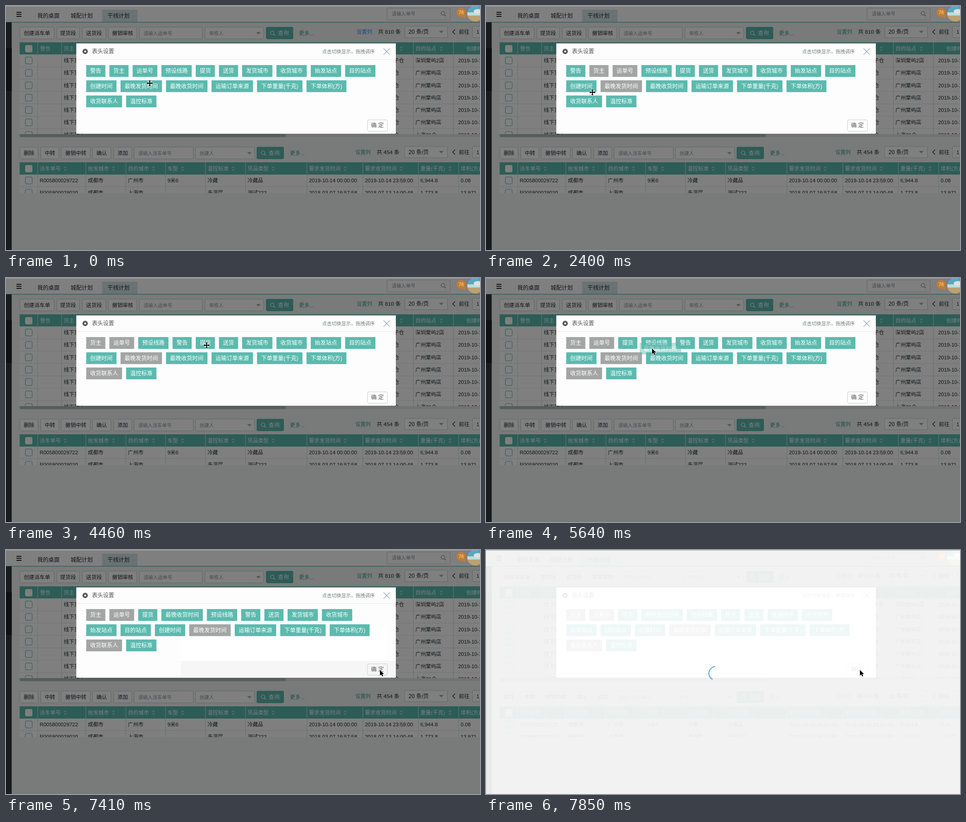
These frames come from a looping animation (1042x537 px, 8000 ms). An HTML page:

```html
<!DOCTYPE html>
<html lang="zh-CN">
<head>
<meta charset="utf-8">
<title>表头设置</title>
<style>
html, body { margin: 0; width: 100%; height: 100%; overflow: hidden; background: #808080; }
svg { display: block; width: 100%; height: 100%; }
text { font-family: "Liberation Sans", "Noto Sans CJK SC", "Noto Sans CJK", sans-serif; white-space: pre; }
</style>
</head>
<body>
<svg id="stage" viewBox="0 0 1042 537" preserveAspectRatio="none"></svg>
<script>
const LOOP = 8000, STEP = 148.3;
const TEAL = '#5bbaae', GRAY = '#a2a5a4', INK = '#23272d', HINT = '#8d9299', EDGE = '#c9cdd2';

// ---- drawing helpers: y of a text is its middle ----
const rect = (x, y, w, h, fill, extra = '') =>
  `<rect x="${x}" y="${y}" width="${w}" height="${h}" fill="${fill}" ${extra}/>`;
const text = (x, y, s, size = 11.5, fill = INK, extra = '') =>
  `<text x="${x}" y="${(y + size * 0.365).toFixed(2)}" font-size="${size}" fill="${fill}" ${extra}>${s}</text>`;
const path = (d, stroke, width = 1, fill = 'none') =>
  `<path d="${d}" stroke="${stroke}" stroke-width="${width}" fill="${fill}"/>`;
const box = (x, y, w, h, fill = '#fff') => rect(x + .5, y + .5, w - 1, h - 1, fill, `rx="3" stroke="${EDGE}"`);
const button = (x, y, w, s) => box(x, y, w, 27) +
  text(x + w / 2, y + 14, s, 11.6, INK, 'text-anchor="middle"');
const check = (y, head) => rect(42.5, y - 7.5, 15, 15, '#fff', `rx="2.500" stroke="${head ? '#fff' : TEAL}"`);
const lens = (x, y, color) =>
  `<circle cx="${x - 1}" cy="${y - 1}" r="4" fill="none" stroke="${color}" stroke-width="1.2"/>` +
  path(`M${x + 2} ${y + 2}l3.5 3.5`, color, 1.3);
const caret = (x, y) => `<path d="M${x - 5} ${y - 2.5}h10l-5 5.5z" fill="#a9adb3"/>`;
const sorter = (x, y) => `<path d="M${x - 4} ${y - 1.5}l4-4l4 4zM${x - 4} ${y + 1.5}l4 4l4-4z" fill="#a5d3cb"/>`;
const search = (x, y) => rect(x, y, 60, 27, TEAL, 'rx="3"') + lens(x + 15, y + 14, '#fff') +
  text(x + 26.5, y + 14, '查询', 12, '#fff');

function field(x, y, w, hint, drop) {
  return box(x, y, w, 27) + text(x + 9.5, y + 14, hint, 10.5, HINT) + (drop ? caret(x + w - 12, y + 14) : '');
}

function pager(x, y, count, id) {
  return text(x, y, '设置列', 11.3, '#36a093', `id="${id}"`) + text(x + 47, y, `共 ${count} 条`, 11.8) +
    box(876, y - 13, 95, 26) + text(885, y, '20 条/页', 12.1) + caret(957, y) +
    path(`M987 ${y - 5}l-5 5l5 5`, INK, 1.3) + text(995.5, y, '前往', 11.6) +
    box(1025, y - 13, 40, 26) + text(1034, y, '1', 11.6);
}

function header() {
  const bars = [14, 18.5, 23].map(y => rect(23, y - 1, 11, 1.8, '#111')).join('');
  return rect(0, 0, 1042, 36, '#fff') + rect(211, 8, 78, 27, '#d5e8e8') + rect(0, 35, 1042, 1.3, TEAL) + bars +
    text(69, 21.5, '我的桌面', 12.2) + text(142, 21.5, '城配计划', 12.2) + text(223, 21.5, '干线计划', 12.2) +
    box(837, 4, 140, 27) + text(848, 17.5, '请输入单号', 10.4, HINT) + lens(961.5, 17, '#8a8f96');
}

function avatar() {
  return '<g fill="#c47d2f"><circle cx="1000.500" cy="14" r="10"/><path d="M1001 22l8-4l1.500 8.500z"/></g>' +
    text(1000.5, 14, '78', 10.5, '#e6dccb', 'text-anchor="middle"') +
    '<clipPath id="face"><circle cx="1031" cy="17" r="17"/></clipPath><g clip-path="url(#face)">' +
    rect(1014, 0, 34, 16, '#58a8c4') + rect(1014, 14, 34, 8, '#c6d8d8') + rect(1014, 21, 34, 14, '#bd9f72') +
    '<ellipse cx="1037" cy="12" rx="9" ry="5" fill="#dbe3e2"/></g>';
}

function upperTable() {
  const head = 94, gap = 27.25;
  let s = rect(30, 80, 1012, 202, '#fff') + rect(30, 80, 1012, 26.5, TEAL) + check(head, true) +
    text(75, head, '警告', 11.5, '#fff') + text(127, head, '货主', 11.5, '#fff') + sorter(869, head) +
    text(900, head, '目的站点', 11.5, '#fff') + sorter(957, head) + text(1012, head, '创建时间', 11.5, '#fff');
  for (let i = 0; i < 7; i++) {
    const y = 120 + i * gap;
    const site = i == 0 ? '深圳棠屿2店' : i == 6 ? '上海01仓' : '广州棠屿店';
    s += check(y) + text(127, y, '线下货主', 11.5) + text(i ? 864.5 : 875, y, '子仓', 11.5, INK, 'text-anchor="end"') +
      text(900, y, site, 11.4) + text(994, y, '2019-10-14', 11.4) + rect(30, y + 13.2, 1012, 1, '#dfe5e4');
  }
  for (const x of [69, 122, 895, 983]) s += rect(x, 80, 1, 202, '#d5dfdd');
  return `<g clip-path="url(#upper)">${s}</g>` + rect(30, 282, 1012, 6.5, '#e4e8e8') +
    rect(30, 282, 585, 6.5, '#a9bdba', 'rx="3"');
}

function lowerTable() {
  const cols = [
    [69, '派车单号', 'R005800029722', 'R005800029020'], [175, '始发城市', '成都市', '成都市'],
    [263, '目的城市', '广州市', '上海市'], [350, '车型', '9米6', ''], [438, '温控标准', '冷藏', '多温层'],
    [526, '货品类型', '冷藏品', '测试222'], [661, '要求发货时间', '2019-10-14 00:00:00', '2018-03-07 16:57:58'],
    [784, '要求收货时间', '2019-10-14 23:59:00', '2018-07-13 14:00:48'],
    [906, '重量(千克)', '6,944.8', '1,773.8'], [994.5, '体积(方)', '0.08', '13.971']];
  let s = rect(30, 344, 1012, 68, '#fff') + rect(30, 344, 1012, 27, TEAL) + rect(30, 397, 1012, 1, '#dfe5e4') +
    check(358, true) + check(384) + check(411);
  for (const [x, name, a, b] of cols) {
    s += rect(x, 344, 1, 68, '#d5dfdd') + text(x + 5, 358, name, 11.6, '#fff') +
      sorter(x + 15 + wide(name) * 11.6, 358) + text(x + 5, 384, a, 11.4) + text(x + 5, 411, b, 11.4);
  }
  return `<g clip-path="url(#lower)">${s}</g>`;
}

// text width in em: full-width characters 1, brackets about a third
function wide(s) { return [...s].reduce((w, c) => w + ('()'.includes(c) ? .36 : 1), 0); }

function dialog() {
  let gear = '';
  for (let a = 0; a < 360; a += 45) gear += rect(172.4, 94, 3.2, 4, '#555', `transform="rotate(${a} 174 100)"`);
  gear += '<circle cx="174" cy="100" r="3.500" fill="none" stroke="#555" stroke-width="2.400"/>';
  return rect(154.5, 82.3, 702.5, 198.7, '#fdfdfd') + rect(155, 117, 702, 1, '#e6e8ea') + gear +
    text(189, 100, '表头设置', 12.2, '#4e5358') + text(695, 100.5, '点击切换显示，拖拽调序', 10.5, '#777c82') +
    path('M830 93.500l13.500 13.500m0-13.500l-13.500 13.500', '#93a7bd', 1.2) +
    `<g id="flash">${rect(384, 174, 450, 70, '#fff')}${rect(384, 244, 473, 37, '#f6f6f6')}</g>` +
    box(794, 250, 45, 26, 'none') + text(816.5, 263, '确 定', 12.2, '#555', 'text-anchor="middle"');
}

// ---- chips ----
const names = ('警告 货主 运单号 预设线路 提货 送货 发货城市 收货城市 始发站点 目的站点 创建时间 最晚发货时间 ' +
  '最晚收货时间 运输订单来源 下单重量(千克) 下单体积(方) 收货联系人 温控标准').split(' ');
const chipW = name => wide(name) * 12.25 + 17.6;
const chip = name => rect(0, 0, chipW(name).toFixed(1), 26, TEAL) +
  text(chipW(name) / 2, 13, name, 12.25, '#fff', 'text-anchor="middle"');

const hidden = { '运单号': 430, '货主': 1020, '最晚发货时间': 1600, '收货联系人': 2650 };
const drags = [
  { from: 3150, to: 3690, name: '警告', gx: 197, gy: 144, before: '提货' },
  { from: 4760, to: 5180, name: '提货', gx: 441, gy: 148, before: '预设线路' },
  { from: 5460, to: 5910, name: '最晚收货时间', gx: 379, gy: 176, before: '预设线路' }];

// time, x, y of the pointer
const track = [
  [0, 316, 170], [140, 316, 168], [440, 305, 150], [600, 305, 148], [1000, 248, 146], [1220, 248, 140],
  [1600, 296, 172], [1850, 292, 182], [2100, 262, 203], [2360, 234, 190], [2650, 216, 209], [2800, 216, 207],
  [3030, 197, 144], [3150, 197, 144], [3430, 375, 147], [3580, 378, 146], [3730, 378, 146], [4400, 441, 148],
  [4740, 441, 148], [5040, 316, 146], [5190, 316, 146], [5340, 378, 176], [5480, 379, 176], [5600, 365, 155],
  [5800, 365, 155], [5920, 357, 156], [6230, 357, 156], [6800, 800, 255], [6960, 835, 271], [7090, 822, 264]];

function pointerAt(t) {
  const i = track.findIndex(k => k[0] > t);
  if (i < 0) return track[track.length - 1].slice(1);
  const [a, x, y] = track[i - 1], [b, u, v] = track[i];
  const p = (t - a) / (b - a), e = p * p * (3 - 2 * p);
  return [x + (u - x) * e, y + (v - y) * e];
}

function layout(t) {
  const order = names.slice(), place = {};
  for (const d of drags) if (t >= d.to) {
    order.splice(order.indexOf(d.name), 1);
    order.splice(order.indexOf(d.before), 0, d.name);
  }
  let x = 176.3, y = 130;
  for (const name of order) {
    const w = chipW(name);
    if (x + w > 830) { x = 176.3; y += 33.5; }
    place[name] = { x, y, w };
    x += w + 8.9;
  }
  return place;
}

// ---- scene ----
const stage = document.getElementById('stage');
stage.innerHTML =
  '<clipPath id="upper"><path d="M30 80H1042V282H30z"/></clipPath>' +
  '<clipPath id="lower"><path d="M30 344H1042V412H30z"/></clipPath>' +
  rect(0, 0, 1042, 537, '#f3f6f5') + header() +
  rect(0, 36, 12.5, 501, '#30363f') + rect(0, 93, 12.5, 94, '#1b2029') +
  button(30, 46, 76, '创建派车单') + button(111, 46, 51, '提货段') + button(167, 46, 53, '送货段') +
  button(225, 46, 63, '撤销审核') + field(293, 46, 139, '请输入运单号') + field(437, 46, 130, '审核人', true) +
  search(571.5, 46) + text(644, 60, '更多...', 11.5, '#36a093') + pager(771, 57, 810, 'link') + upperTable() +
  button(30, 310, 41, '删除') + button(76, 310, 41, '中转') + button(121, 310, 65, '撤销中转') +
  button(190, 310, 41, '确认') + button(236, 310, 41, '添加') + field(281, 310, 131, '请输入派车单号') +
  field(416, 310, 131, '创建人', true) + search(551, 310) + text(624, 324, '更多...', 11.5, '#36a093') +
  pager(768, 321.5, 454, 'link2') + lowerTable() +
  rect(0, 0, 1042, 537, '#000', 'opacity=".5"') + avatar() + dialog() +
  names.map(n => `<g class="chip">${chip(n)}</g>`).join('') + '<g id="ghost" opacity=".42"></g>' +
  rect(0, 0, 1042, 537, '#fff', 'id="mask"') + rect(0, 0, 1042, 1, '#a9abab') +
  '<circle id="spin" cx="505" cy="271.500" r="15" fill="none" stroke="#409eff" stroke-width="1.800" pathLength="360"/>' +
  '<g id="pointer" stroke="#fff" stroke-width="1.400" paint-order="stroke">' +
  '<path id="arrow" d="M0 0V12.500L3 9.800L5 14.300L7.100 13.400L5.200 9H9Z"/>' +
  '<path id="cross" d="M0-7L2.600-4H.9V-.9H4V-2.600L7 0L4 2.600V.9H.9V4H2.600L0 7L-2.600 4H-.9V.9H-4V2.600L-7 0L-4-2.600V-.9H-.9V-4H-2.600Z"/></g>';

const $ = id => document.getElementById(id);
const chips = [...stage.querySelectorAll('.chip')];
const ghost = $('ghost'), mask = $('mask'), spin = $('spin');
const show = (el, on) => el.setAttribute('visibility', on ? 'visible' : 'hidden');
const move = (el, x, y) => el.setAttribute('transform', `translate(${x.toFixed(1)} ${y.toFixed(1)})`);

function draw(t) {
  const s = t < 140 ? 0 : 140 + Math.floor((t - 140) / STEP) * STEP; // the picture advances in steps
  const place = layout(s), [x, y] = pointerAt(s);
  names.forEach((name, i) => {
    move(chips[i], place[name].x, place[name].y);
    chips[i].firstChild.setAttribute('fill', s >= hidden[name] ? GRAY : TEAL);
  });

  const drag = drags.find(d => s >= d.from && s < d.to);
  show(ghost, drag);
  if (drag) {
    ghost.innerHTML = chip(drag.name);
    move(ghost, place[drag.name].x + x - drag.gx, place[drag.name].y + y - drag.gy);
  }

  const over = Object.values(place).some(p => x > p.x - 2 && x < p.x + p.w + 2 && y > p.y - 2 && y < p.y + 28);
  move($('pointer'), x, y);
  show($('cross'), over && !drag);
  show($('arrow'), !over || drag);

  $('link').setAttribute('fill', t < 140 ? '#2a92ff' : '#36a093');
  show($('flash'), t >= 7410 && t < 7620);
  mask.setAttribute('opacity', t < 7620 ? 0 : t < 7850 ? .8 : .9);
  show(spin, t >= 7620);
  const [start, sweep] = t < 7850 ? [32, 42] : [118, 147];
  spin.setAttribute('transform', `rotate(${start} 505 271.5)`);
  spin.setAttribute('stroke-dasharray', `${sweep} 360`);
}

const begin = performance.now();
function tick() {
  draw((performance.now() - begin) % LOOP);
  requestAnimationFrame(tick);
}
tick();
</script>
</body>
</html>
```
